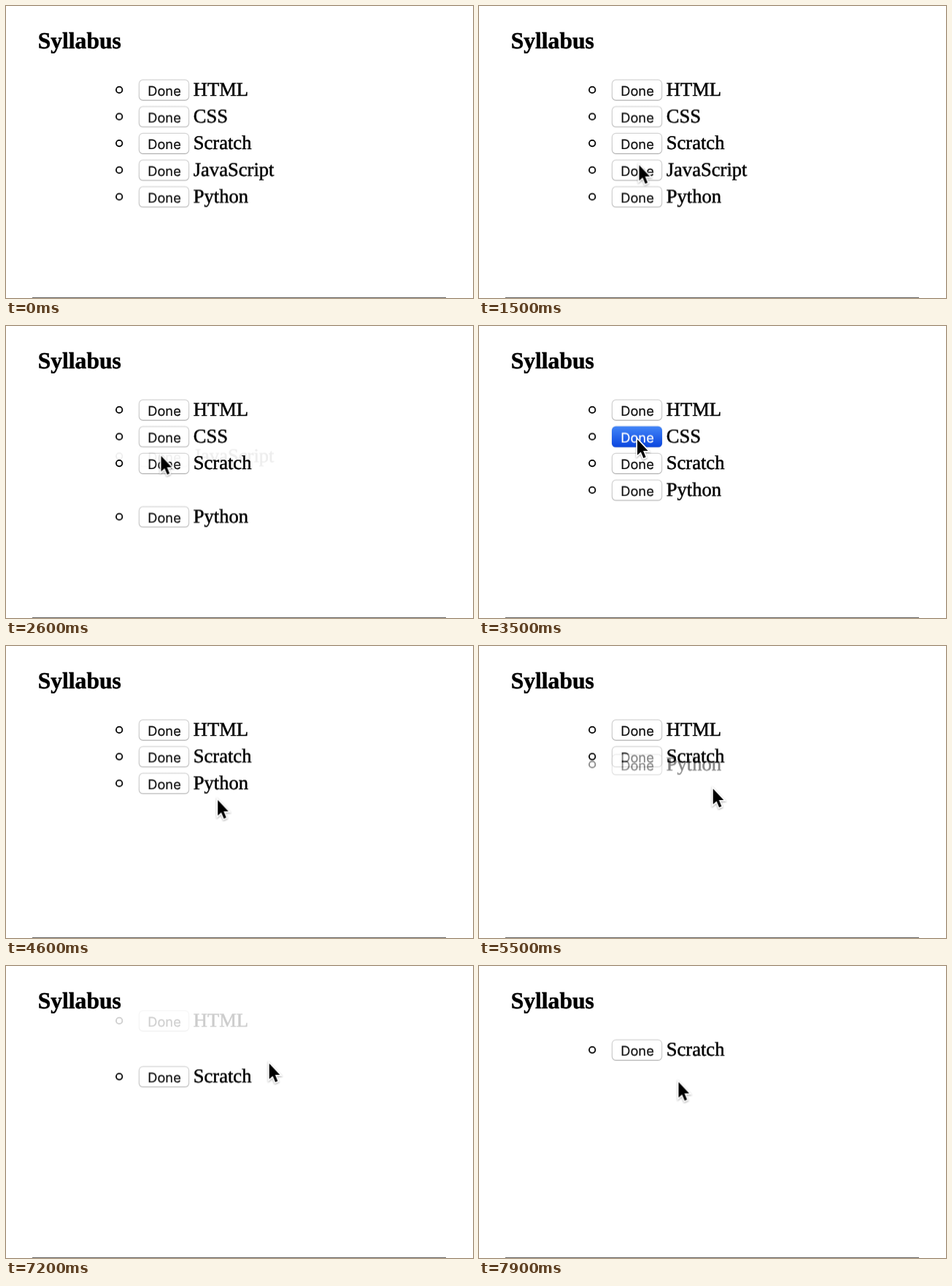
These frames come from a looping animation (640 by 400 pixels, 8000 ms). An HTML page:

```html
<!DOCTYPE html>
<html lang="en">
<head>
<meta charset="utf-8">
<title>Syllabus</title>
<style>
html, body { margin: 0; width: 100%; height: 100%; overflow: hidden; background: #fff; }
svg { display: block; width: 640px; height: 400px; }
text { fill: #000; text-rendering: geometricPrecision; }
.title { font: bold 31.6px "Liberation Serif", "Times New Roman", serif; stroke: #000; stroke-width: .5px; }
.name { font: 26.6px "Liberation Serif", "Times New Roman", serif; stroke: #000; stroke-width: .5px; }
.label { font: 18.3px Inter, Roboto, sans-serif; text-anchor: middle; fill: #111; stroke: #111; stroke-width: .2px; }
#pressed .label { fill: #fff; stroke: #fff; }

/* Each row: slot = place in the list, item = fade out, hot = pressed button */
.slot, .hot { animation: 8s step-end infinite; }
.item { animation: 8s ease infinite; }
.hot { opacity: 0; }

.html .item { animation-name: html-out; }
.css .item { animation-name: css-out; }
.js .item { animation-name: js-out; }
.python .item { animation-name: python-out; }
.html .hot { animation-name: html-press; }
.css .hot { animation-name: css-press; }
.js .hot { animation-name: js-press; }
.python .hot { animation-name: python-press; }
.scratch.slot { animation-name: scratch-slot; }
.python.slot { animation-name: python-slot; }

@keyframes js-press { 0% { opacity: 0 } 22.5% { opacity: 1 } 23.75%, 100% { opacity: 0 } }
@keyframes css-press { 0% { opacity: 0 } 43.75% { opacity: 1 } 45%, 100% { opacity: 0 } }
@keyframes python-press { 0% { opacity: 0 } 63.75% { opacity: 1 } 65%, 100% { opacity: 0 } }
@keyframes html-press { 0% { opacity: 0 } 83.13% { opacity: 1 } 83.81%, 100% { opacity: 0 } }

@keyframes js-out {
  0%, 24.1% { opacity: 1; transform: translateY(0) }
  36.6%, 100% { opacity: 0; transform: translateY(-50px) }
}
@keyframes css-out {
  0%, 45% { opacity: 1; transform: translateY(0) }
  57.45%, 100% { opacity: 0; transform: translateY(-50px) }
}
@keyframes python-out {
  0%, 65% { opacity: 1; transform: translateY(0) }
  77.5%, 100% { opacity: 0; transform: translateY(-50px) }
}
@keyframes html-out {
  0%, 83.81% { opacity: 1; transform: translateY(0) }
  96.31%, 100% { opacity: 0; transform: translateY(-50px) }
}

@keyframes scratch-slot {
  0% { transform: translateY(73.2px) }
  57.45% { transform: translateY(36.6px) }
  96.31%, 100% { transform: translateY(0) }
}
@keyframes python-slot {
  0% { transform: translateY(146.4px) }
  36.6% { transform: translateY(109.8px) }
  57.45%, 100% { transform: translateY(73.2px) }
}

.pointer {
  animation: move 8s linear infinite;
  filter: drop-shadow(0 1.5px 1.2px rgba(0, 0, 0, .35));
}
@keyframes move {
  0%, 3.74% { opacity: 0; transform: translate(517px, 352px) }
  3.75% { opacity: 1; transform: translate(517px, 352px) }
  5% { transform: translate(448px, 292px) }
  6.25% { transform: translate(372px, 218px) }
  7.5% { transform: translate(300px, 150px) }
  8.75% { transform: translate(248px, 114px) }
  10% { transform: translate(228px, 112px) }
  11.25% { transform: translate(219px, 150px) }
  12.5% { transform: translate(218px, 192px) }
  13.75% { transform: translate(219px, 215px) }
  18.75%, 25% { transform: translate(219.5px, 218.5px) }
  28.75% { transform: translate(216px, 206px) }
  32.5% { transform: translate(212.5px, 178.5px) }
  37.5% { transform: translate(215px, 162px) }
  40%, 45.5% { transform: translate(217px, 156px) }
  48.75% { transform: translate(290px, 161px) }
  51.25% { transform: translate(420px, 173px) }
  52.5% { transform: translate(454px, 177px) }
  53.75% { transform: translate(456px, 177px) }
  55% { transform: translate(420px, 190px) }
  56.25% { transform: translate(350px, 205px) }
  57.5% { transform: translate(290.5px, 211.5px) }
  60% { transform: translate(236px, 209px) }
  62.5% { transform: translate(217px, 196px) }
  63.75%, 65.6% { transform: translate(216px, 193px) }
  68.75% { transform: translate(320px, 196px) }
  71.25% { transform: translate(470px, 200px) }
  72.5% { transform: translate(526px, 200px) }
  73.75% { transform: translate(537px, 198px) }
  75% { transform: translate(515px, 194px) }
  76.25% { transform: translate(466px, 186px) }
  77.5% { transform: translate(408px, 174px) }
  80% { transform: translate(300px, 146px) }
  82.5% { transform: translate(233.5px, 126.5px) }
  83.75%, 86.25% { transform: translate(222px, 120px) }
  87.5% { transform: translate(238px, 122px) }
  90% { transform: translate(360px, 134px) }
  91.25% { transform: translate(430px, 142px) }
  92.5% { transform: translate(464px, 148px) }
  93.75% { transform: translate(458px, 152px) }
  95% { transform: translate(420px, 155px) }
  96.25% { transform: translate(360px, 158px) }
  97.5% { transform: translate(305px, 159px) }
  98.75%, 100% { opacity: 1; transform: translate(273.5px, 159.5px) }
}
</style>
</head>
<body>
<svg viewBox="0 0 640 400">
  <defs>
    <linearGradient id="blue" x2="0" y2="1">
      <stop offset="0" stop-color="#4386f8"/>
      <stop offset="1" stop-color="#0a45df"/>
    </linearGradient>
    <linearGradient id="edge" x2="0" y2="1">
      <stop offset="0" stop-color="#d4d4d4"/>
      <stop offset=".8" stop-color="#cacaca"/>
      <stop offset="1" stop-color="#b0b0b0"/>
    </linearGradient>
    <g id="base">
      <circle cx="155.2" cy="114.9" r="4.2" fill="none" stroke="#000" stroke-width="1.8"/>
      <rect x="182.4" y="101.2" width="68.2" height="28" rx="5.2" fill="#fff" stroke="url(#edge)" stroke-width="1.2"/>
      <text class="label" x="217" y="122.6">Done</text>
    </g>
    <g id="pressed">
      <rect x="182" y="100.8" width="69" height="28.8" rx="5.4" fill="url(#blue)"/>
      <text class="label" x="217" y="122.6">Done</text>
    </g>
  </defs>

  <text class="title" x="43.7" y="58">Syllabus</text>

  <g class="html">
    <g class="item">
      <use href="#base"/><use class="hot" href="#pressed"/>
      <text class="name" x="256.7" y="123">HTML</text>
    </g>
  </g>
  <g class="css" transform="translate(0 36.6)">
    <g class="item">
      <use href="#base"/><use class="hot" href="#pressed"/>
      <text class="name" x="256.7" y="123">CSS</text>
    </g>
  </g>
  <g class="scratch slot">
    <use href="#base"/>
    <text class="name" x="256.7" y="123">Scratch</text>
  </g>
  <g class="js" transform="translate(0 109.8)">
    <g class="item">
      <use href="#base"/><use class="hot" href="#pressed"/>
      <text class="name" x="256.7" y="123">JavaScript</text>
    </g>
  </g>
  <g class="python slot">
    <g class="item">
      <use href="#base"/><use class="hot" href="#pressed"/>
      <text class="name" x="256.7" y="123">Python</text>
    </g>
  </g>

  <rect x="36" y="399" width="567" height="1" fill="#666"/>

  <g class="pointer">
    <path d="M0 -.5V20.8L4.8 16.4 8.4 24.9 11.6 23.5 8.1 15.1H14.6Z" fill="#000" stroke="#fff" stroke-width="3.4" paint-order="stroke"/>
  </g>
</svg>
</body>
</html>
```
